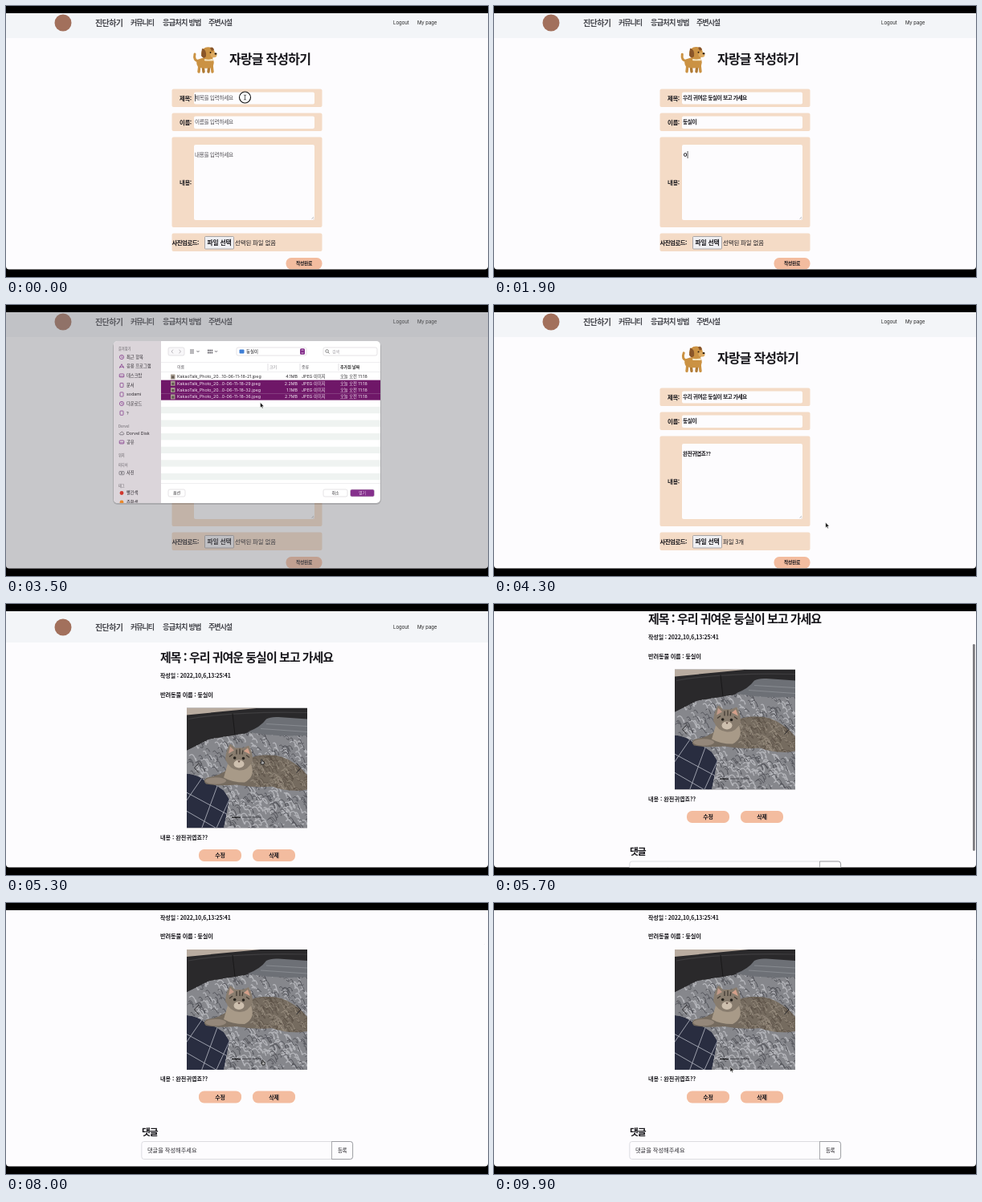
Write an HTML page that moves like this. It is 600 by 338 pixels and loops after 10000 ms.

```html
<!DOCTYPE html>
<html lang="ko">
<head>
<meta charset="utf-8">
<title>자랑글 작성하기</title>
<style>
html, body { margin: 0; width: 100%; height: 100%; overflow: hidden; background: #000; }
svg { display: block; width: 100vw; height: 100vh; }
text { font-family: "Noto Sans CJK KR", "Noto Sans CJK", sans-serif; fill: #17161b; white-space: pre; }
.b { font-weight: 700; }
.m { font-weight: 500; }
.ui { font-family: Inter, "Noto Sans CJK KR", "Noto Sans CJK", sans-serif; }
</style>
</head>
<body>
<svg id="stage" viewBox="0 0 600 338"></svg>
<script>
const LOOP = 10000;
const PET = '둥실이';
const TITLE = `우리 귀여운 ${PET} 보고 가세요`;
const BODY = '완전귀엽죠??';
const PEACH = '#f4dbc6', SALMON = '#f3bc9f', PAGE = '#fdfcfe', PURPLE = '#6f1768';
const QUILT = 'M0 53L28 39L72 32L94 25L150 28V150H0Z';
const BLANKET = 'M0 82Q14 83 24 92Q36 95 46 103L53 114Q50 132 46 150H0Z';

// Markup helpers; text is placed by its vertical centre.
const text = (x, y, str, size, { cls = 'b', ls = 0, fill = '', anchor = 'start', id = '' } = {}) =>
  `<text x="${x}" y="${y + size * 0.37}" font-size="${size}" letter-spacing="${ls}" class="${cls}"
    text-anchor="${anchor}"${id && ` id="${id}"`}${fill && ` style="fill:${fill}"`}>${str}</text>`;
const rect = (x, y, w, h, fill, rx = 0, extra = '') =>
  `<rect x="${x}" y="${y}" width="${w}" height="${h}" fill="${fill}" rx="${rx}" ${extra}/>`;
const circle = (x, y, r, fill, extra = '') => `<circle cx="${x}" cy="${y}" r="${r}" fill="${fill}" ${extra}/>`;
const oval = (x, y, rx, ry, fill) => `<ellipse cx="${x}" cy="${y}" rx="${rx}" ry="${ry}" fill="${fill}"/>`;
const shape = (d, fill) => `<path d="${d}" fill="${fill}"/>`;
const line = (d, stroke, w = 1, extra = '') =>
  `<path d="${d}" fill="none" stroke="${stroke}" stroke-width="${w}" ${extra}/>`;
const group = (id, body) => `<g id="${id}">${body}</g>`;
const move = (x, y, body) => `<g transform="translate(${x} ${y})">${body}</g>`;
const clip = (id, body) => `<g clip-path="url(#${id})">${body}</g>`;
const button = (x, y, w, h, label, size) =>
  rect(x, y, w, h, SALMON, 6.5) + text(x + w / 2, y + h / 2, label, size, { anchor: 'middle', ls: -0.3 });

function nav() {
  const o = ls => ({ ls, fill: '#45464c' });
  return rect(0, 0, 600, 40, '#f3f5f8') + circle(71, 21, 10.5, '#a2705c') +
    text(111, 21, '진단하기', 10, o(-0.6)) + text(155, 21, '커뮤니티', 9, o(-1)) +
    text(195, 21, '응급처치 방법', 9.2, o(-0.8)) + text(252, 21, '주변시설', 9, o(-1)) +
    text(482, 20.5, 'Logout', 6, { cls: 'ui', fill: '#222' }) +
    text(512, 20.5, 'My page', 5.9, { cls: 'ui', fill: '#222' });
}

function dog() {
  const tan = '#cb9243', dark = '#8a5629';
  return group('tail', line('M240 69Q233 68 235 60', tan, 3, 'stroke-linecap="round"')) +
    ['M241 73L240 82', 'M245 74L246 82', 'M253 74L252 82', 'M256 73L257 82']
      .map((d, i) => line(d, i % 3 ? '#b07a34' : tan, 3.4, 'stroke-linecap="round"')).join('') +
    shape('M238 67Q247 63 257 65Q261 72 256 77Q246 79 239 76Q236 72 238 67Z', tan) +
    rect(247, 66, 11, 2.6, '#f4e6c4', 1.3) +
    oval(251.5, 59, 8.5, 7.8, tan) + oval(258.5, 61, 4, 3.2, '#dcab63') +
    shape('M244 53Q250 54 249 63Q246 67 243 62Z', dark) + shape('M254 52Q258 50 259 55L256 56Z', dark) +
    circle(254.5, 58, 0.9, '#20150c') + oval(261, 59.6, 1.5, 1.1, '#20150c');
}

const FIELDS = [
  { id: 'title', y: 114.5, hint: '제목을 입력하세요', value: TITLE, from: 150, to: 1200 },
  { id: 'name', y: 145, hint: '이름을 입력하세요', value: PET, from: 1400, to: 1700 },
  { id: 'body', y: 185.5, hint: '내용을 입력하세요', value: BODY, from: 1850, to: 2350 },
];

function form() {
  const rows = [[103.5, 22.5], [133.5, 22.5], [163.5, 112.5], [283.5, 22.5]];
  const inputs = [[107.5, 15], [137.5, 15.5], [173, 94]];
  return nav() + group('dog', dog()) +
    text(278, 66, '자랑글 작성하기', 16, { ls: -0.8 }) +
    rows.map(([y, h]) => rect(206.5, y, 187, h, PEACH, 2)).join('') +
    inputs.map(([y, h]) => rect(234, y, 150, h, PAGE, 2)).join('') +
    line('M380.5 265.5L383 263M382 265.8L383.2 264.6', '#888', 0.5) +
    ['제목:', '이름:', '내용:'].map((s, i) => text(216, [115, 145, 220][i], s, 7.4, { ls: -0.4 })).join('') +
    text(206.5, 295, '사진업로드:', 7.4, { ls: -0.5 }) +
    rect(247.5, 287.5, 36, 15.5, '#efeff2', 1, 'stroke="#8b8b90" stroke-width=".7"') +
    text(265.5, 295, '파일 선택', 7.8, { ls: -0.2, anchor: 'middle' }) +
    text(285, 295, '선택된 파일 없음', 7.4, { cls: 'm', ls: -0.1, id: 'files' }) +
    button(348.5, 314, 45, 14.3, '작성완료', 5.8) +
    FIELDS.map(f => text(235, f.y, f.hint, 6.6, { cls: '', ls: -0.3, fill: '#4d4b50', id: f.id + 'Hint' }) +
      text(235, f.y, '', 6.7, { ls: -0.45, id: f.id })).join('') +
    rect(0, 0, 0.7, 9, '#111', 0, 'id="caret"');
}

// Seeded short strokes inside a box: quilt stitching and fur.
function strokes(seed, n, x, y, w, h, size) {
  const rnd = () => (seed = (seed * 16807) % 2147483647) / 2147483647;
  let d = '';
  for (let i = 0; i < n; i++) {
    const s = size * (0.6 + rnd());
    const v = [x + rnd() * w, y + rnd() * h, s, -s, s * 1.6, rnd() * size, (rnd() - 0.5) * size * 2, rnd() * size]
      .map(k => k.toFixed(1));
    d += `M${v[0]} ${v[1]}q${v[2]} ${v[3]} ${v[4]} ${v[5]}t${v[6]} ${v[7]}`;
  }
  return d;
}

const CAT = 'M74 66Q84 58 100 59Q118 58 132 68Q142 74 150 84V102Q128 106 106 98Q84 100 62 96Q40 98 24 95Q19 91 25 87Q42 85 51 76Z';

function cat() {
  return shape(CAT, '#756b5f') +
    clip('cat', line(strokes(5, 90, 80, 58, 70, 46, 3), '#574e44', 1, 'opacity=".7"') +
      line(strokes(31, 70, 74, 64, 76, 42, 3), '#a3978a', 0.8, 'opacity=".8"')) +
    oval(36, 91, 13, 4.2, '#94877a') +
    shape('M51 70Q64 82 80 70Q86 86 72 93Q56 93 46 87Z', '#a89a88') +
    shape('M48 64Q49 52 54 45Q58 47 60 50H70L77 47Q82 54 82 66Q76 79 65 78Q53 77 48 64Z', '#887c6e') +
    shape('M54 48L59 53L52 57Z', '#c39b8a') + shape('M76 50L71 54L79 58Z', '#d3a08a') +
    line('M62 52V58M66 51V58M70 53L69 58M57 58L53 61M74 59L78 62', '#453d35', 1.3) +
    oval(65, 70, 6.5, 5, '#cdbfae') + circle(59.7, 62.5, 1.8, '#25211c') + circle(70.5, 63, 1.8, '#25211c') +
    shape('M63.3 66H66.9L65 68.4Z', '#5e4940');
}

function photo() {
  return rect(0, 0, 150, 150, '#2a292b') +
    shape('M0 0H92L50 4L0 9Z', '#b9aca0') + line('M2 14Q60 4 150 6', '#3e3d3f', 1.2) +
    line('M57 7L60 34', '#191819', 1) +
    clip('quilt', shape(QUILT, '#86878c') +
      line(strokes(17, 260, 0, 26, 150, 124, 3), '#b4b5ba', 1.3) +
      line(strokes(91, 240, 0, 26, 150, 124, 3), '#54555b', 1)) +
    shape('M76 30Q92 24 99 14Q104 11 114 11.5L150 14V34Q112 37 76 30Z', '#6d7076') +
    line('M99 20L150 23M92 26L150 30', '#8b8e94', 0.9) +
    clip('blanket', shape(BLANKET, '#292d40') +
      line('M-5 103L60 138M-5 126L40 152M10 80L60 108M40 92L18 152M-2 118L20 86M56 108L36 152', '#a9acb7', 0.9)) +
    cat();
}

function post() {
  return move(0, 8, nav()) + text(192, 66, `제목 : ${TITLE}`, 15, { ls: -1 }) +
    text(192, 89.5, '작성일 : 2022,10,6,13:25:41', 7, { ls: -0.12 }) +
    text(192, 113, `반려동물 이름 : ${PET}`, 7.3, { ls: -0.25 }) +
    move(225, 129.5, clip('frame', photo())) +
    line('M240 198.5L234.5 204.5L240 210.5M361.5 198.5L367 204.5L361.5 210.5', '#29282b', 1) +
    rect(281, 265.5, 11, 1.2, '#08080a') + rect(294, 265.5, 11, 1, '#4b4b50') + rect(307, 265.5, 11, 1, '#4b4b50') +
    text(192, 291, `내용 : ${BODY}`, 7.1) +
    button(240, 306, 53, 15, '수정', 7) + button(307, 306, 53, 15, '삭제', 7) +
    text(169, 357, '댓글', 11.8, { ls: -1.2 }) +
    rect(168.8, 369, 262.8, 22, PAGE, 3, 'stroke="#d5d5da" stroke-width=".8"') +
    text(176, 380.3, '댓글을 작성해주세요', 7.2, { cls: '', fill: '#2c2b30' }) +
    line('M405.5 369H428.6Q431.6 369 431.6 372V388Q431.6 391 428.6 391H405.5Z', '#85868c', 0.7) +
    text(418.5, 380.3, '등록', 6.4, { cls: '', anchor: 'middle', ls: -0.4 });
}

function sidebar() {
  const heads = [[54, '즐겨찾기'], [151, 'Dorvel'], [187, '위치'], [199.5, '미디어'], [225, '태그']];
  const items = [[65, '최근 항목', 'o'], [76.3, '응용 프로그램', 'a'], [88, '데스크탑', 'w'], [100, '문서', 'd'],
    [111.5, 'sodami', 'd'], [123, '다운로드', 'o'], [134.7, '?', 'd'], [160, 'Dorvel Disk', 'c'],
    [171, '공유', 'w'], [209.5, '사진', 'p'], [234.5, '빨간색', '#d0382f'], [246, '주황색', '#e8892c']];
  const ink = 'stroke="#7c2f86" stroke-width=".7"';
  const icon = (k, y) => ({
    o: circle(144, y, 2.6, 'none', ink) + line(`M144 ${y - 1.4}V${y + 0.4}H145.3`, '#7c2f86', 0.6),
    a: line(`M141.4 ${y + 2.5}L144 ${y - 2.6}L146.6 ${y + 2.5}M141 ${y + 0.9}H147`, '#7c2f86', 0.7),
    w: rect(141.2, y - 2, 5.6, 4, 'none', 0.8, ink) + line(`M141.2 ${y + 0.8}H146.8`, '#7c2f86', 0.6),
    d: rect(142, y - 2.6, 4, 5.2, 'none', 0.6, ink),
    c: line(`M142 ${y + 1.8}H146Q147.6 ${y + 1} 146.2 ${y - 0.4}Q144.5 ${y - 3.4} 142.4 ${y - 0.6}Q140 ${y + 0.8} 142 ${y + 1.8}Z`, '#5d5a60', 0.7),
    p: rect(141, y - 2, 6, 4.2, 'none', 0.8, 'stroke="#66636a" stroke-width=".7"') + circle(144, y, 1.1, '#66636a'),
  })[k] || circle(144, y, 2.4, k);
  return rect(134, 45, 59, 202, '#dbd5da') +
    heads.map(([y, s]) => text(140, y, s, 4.2, { cls: 'ui b', fill: '#8b868c' })).join('') +
    items.map(([y, s, k]) => icon(k, y) + text(150, y, s, 5.3, { cls: 'ui', fill: '#2f2b31' })).join('');
}

function fileRow(name, size, i) {
  const y = 89.5 + i * 8.3;
  const row = fill => {
    const o = { cls: 'ui', fill };
    return text(213, y, name, 5.3, o) + text(363, y, size, 5.3, { ...o, anchor: 'end' }) +
      text(368, y, 'JPEG 이미지', 5.3, o) + text(416, y, '오늘 오전 11:18', 5.3, o);
  };
  return row('#2c2a2e') +
    (i ? group('pick' + i, rect(193, y - 4.15, 273, 8.4, PURPLE) + row('#f3e6f2')) : '') +
    rect(205, y - 3, 5.5, 6, '#a59a8d', 0.5) + rect(206.3, y - 1, 3, 3, '#5f574f', 1);
}

function dialog() {
  const ui = (x, y, s, fill = '#2c2a2e', o = {}) => text(x, y, s, 5, { cls: 'ui', fill, ...o });
  const file = s => `KakaoTalk_Photo_20...${s}.jpeg`;
  const files = [['10-06-11-18-21', '4.1MB'], ['0-06-11-18-29', '2.2MB'], ['0-06-11-18-32', '1.1MB'], ['0-06-11-18-36', '2.7MB']];
  let stripes = '';
  for (let y = 126.9; y < 220; y += 16.6) stripes += rect(193, y, 273, 8.3, '#eff3f1');
  const edge = 'stroke="#d4d2d6" stroke-width=".6"';
  const push = (x, w, label, fill = '#fff', ink) =>
    rect(x, 230, w, 9, fill, 2, edge) + ui(x + w / 2, 234.5, label, ink, { anchor: 'middle' });
  return rect(0, 9, 600, 321, '#76757a', 0, 'opacity=".4"') +
    rect(133, 46, 334, 203, '#000', 6, 'opacity=".14"') +
    clip('sheet', rect(134, 45, 332, 202, '#fff') + sidebar() +
      rect(202, 53, 20, 10, '#f8f7f9', 2, edge) +
      line('M208 55.7L206 58L208 60.3M215.5 55.7L217.5 58L215.5 60.3', '#aaa7ad', 0.8) +
      line('M229 56H234M229 58H234M229 60H234M237.5 57L239 58.7L240.5 57M260 57L261.5 58.7L263 57', '#55525a', 0.8) +
      [251, 253.3, 255.6].map(x => rect(x, 55.7, 1.6, 1.8, '#55525a') + rect(x, 58.6, 1.6, 1.8, '#55525a')).join('') +
      rect(287, 53, 87, 10, '#fff', 2, edge) + rect(290.5, 55.5, 6, 5, '#3f7fd6', 1) +
      text(299, 58, PET, 5.4, { cls: 'ui' }) + rect(366, 54.2, 6, 7.6, '#85308c', 1.5) +
      line('M367.7 57L369 55.6L370.3 57M367.7 59L369 60.4L370.3 59', '#fff', 0.6) +
      rect(395, 53, 67, 10, '#fff', 2, edge) + circle(399.6, 57.5, 1.8, 'none', 'stroke="#555" stroke-width=".7"') +
      line('M401 59L402.6 60.6', '#555', 0.7) + ui(406, 58, '검색', '#a5a2a8') +
      line('M193 71.5H466M193 83.5H466', '#e4e2e6', 0.6) + line('M326 73V82M366 73V82M414 73V82', '#cfccd2', 0.6) +
      ui(213, 77.2, '이름', '#5d5a60') + ui(328, 77.2, '크기', '#8b888e') + ui(368, 77.2, '종류', '#5d5a60') +
      ui(416, 77.2, '추가된 날짜', '#222', { cls: 'ui b' }) + stripes +
      files.map(([s, size], i) => fileRow(file(s), size, i)).join('') +
      line('M193 222.5H466', '#e4e2e6', 0.6) +
      push(202, 21, '옵션') + push(395, 30, '취소') + push(428.5, 30, '열기', '#85308c', '#e6cbe8'));
}

const pointers =
  group('beam', circle(0, 0, 7, '#fff', 'stroke="#111" stroke-width="1.1"') +
    line('M-1.5 -3Q0 -3 0 -2V2Q0 3 -1.5 3M1.5 -3Q0 -3 0 -2M0 2Q0 3 1.5 3', '#222', 0.7)) +
  group('arrow', '<path d="M0 0V6.6L1.5 5.3L2.5 7.6L3.6 7.1L2.6 4.9H4.6Z" fill="#111" stroke="#fff" stroke-width=".5"/>') +
  group('hand', '<path d="M-1.3 -3Q-.4 -3.6 0 -2.6L.3 -1L2.4 -.3Q2.8 2 1.7 3H-.9L-2.5 .8L-1 .4Z" fill="#aaa" stroke="#111" stroke-width=".8"/>');

const clipPath = (id, d) => `<clipPath id="${id}"><path d="${d}"/></clipPath>`;
document.getElementById('stage').innerHTML = '<defs>' +
  clipPath('win', 'M0 9H600V324.4Q600 328.4 596 328.4H4Q0 328.4 0 324.4Z') +
  clipPath('frame', 'M0 0H150V150H0Z') + clipPath('quilt', QUILT) + clipPath('blanket', BLANKET) + clipPath('cat', CAT) +
  '<clipPath id="sheet"><rect x="134" y="45" width="332" height="202" rx="5"/></clipPath></defs>' +
  rect(0, 0, 600, 338, '#000') +
  clip('win', rect(0, 9, 600, 320, PAGE) + group('form', form()) + group('post', post()) + group('dialog', dialog()) +
    rect(596, 0, 2.8, 258, '#7d7c80', 1.4, 'id="bar"') + pointers);

const $ = id => document.getElementById(id);
const show = (id, on) => { $(id).style.display = on ? '' : 'none'; };
const put = (id, str) => { if ($(id).textContent !== str) $(id).textContent = str; };
const clamp = (v, a = 0, b = 1) => Math.min(b, Math.max(a, v));
const smooth = u => u * u * (3 - 2 * u);

// Every state of a Korean string as it is keyed in, letter by letter.
function keystrokes(str) {
  const states = [''];
  let done = '';
  for (const c of str) {
    const code = c.charCodeAt(0) - 0xac00;
    if (code >= 0 && code < 11172) {
      states.push(done + 'ㄱㄲㄴㄷㄸㄹㅁㅂㅃㅅㅆㅇㅈㅉㅊㅋㅌㅍㅎ'[Math.floor(code / 588)]);
      if (code % 28) states.push(done + String.fromCharCode(0xac00 + code - code % 28));
    }
    states.push(done += c);
  }
  return states;
}
FIELDS.forEach(f => { f.states = keystrokes(f.value); });

// Value of a [time, ...values] track at time t.
function track(keys, t, ease = u => u) {
  const i = keys.findIndex(k => k[0] > t);
  if (i < 0) return keys[keys.length - 1].slice(1);
  if (!i) return keys[0].slice(1);
  const [a, b] = [keys[i - 1], keys[i]];
  const u = ease((t - a[0]) / (b[0] - a[0]));
  return a.slice(1).map((v, n) => v + (b[n + 1] - v) * u);
}

const SCROLL = [[5500, 0], [5690, 48], [5800, 48], [5900, 60], [6100, 60], [6500, 71.5]];
const MOUSE = [[0, 297.5, 114], [2350, 300, 190], [2580, 265, 295], [2750, 265, 295], [3050, 255, 98], [3150, 255, 98],
  [3300, 270, 115], [3450, 316.5, 121.5], [3600, 316.5, 121.5], [3950, 443, 235], [4100, 443, 235], [4550, 371, 321],
  [4800, 371, 321], [5200, 319, 197], [6900, 320, 199], [8300, 320, 199], [8750, 210, 300], [9250, 290, 240],
  [9700, 294, 204], [9900, 294, 204]];
const OPEN = 2700, PICKED = 4050, SENT = 4800;

function pointerKind(t) {
  if (t < 250) return 'beam';
  if (t < 2350 || (t >= 5500 && t < 6500)) return '';
  return t >= 5200 && t < 8400 ? 'hand' : 'arrow';
}

function draw(t) {
  show('form', t < SENT);
  show('post', t >= SENT);
  show('dialog', t >= OPEN && t < PICKED);
  show('pick1', t >= 3100);
  show('pick2', t >= 3300);
  show('pick3', t >= 3300);
  put('files', t < PICKED ? '선택된 파일 없음' : '파일 3개');

  let active = FIELDS[0];
  for (const f of FIELDS) {
    const n = f.states.length - 1;
    const k = Math.floor(clamp((t - f.from) / (f.to - f.from)) * n);
    put(f.id, f.states[k]);
    show(f.id + 'Hint', !k);
    if (t >= f.from - 100) active = f;
  }
  show('caret', t < 2580);
  if (t < SENT) {
    const x = 235 + $(active.id).getComputedTextLength();
    $('caret').setAttribute('transform', `translate(${x} ${active.y - 4.5})`);
  }

  const swing = Math.sin(t / 1000 * Math.PI * 2);
  $('dog').setAttribute('transform', `translate(0 ${0.4 * swing})`);
  $('tail').setAttribute('transform', `rotate(${8 * swing} 240 69)`);

  const [y] = track(SCROLL, t);
  $('post').setAttribute('transform', `translate(0 ${-y})`);
  $('bar').setAttribute('y', 11 + y * 0.81);
  $('bar').style.opacity = t < 5500 ? 0 : clamp((7500 - t) / 300);

  const [mx, my] = track(MOUSE, t, smooth);
  const kind = pointerKind(t);
  for (const id of ['beam', 'arrow', 'hand']) {
    show(id, id === kind);
    $(id).setAttribute('transform', `translate(${mx} ${my})`);
  }
}

function tick() {
  draw(performance.now() % LOOP);
  requestAnimationFrame(tick);
}
tick();
</script>
</body>
</html>
```
